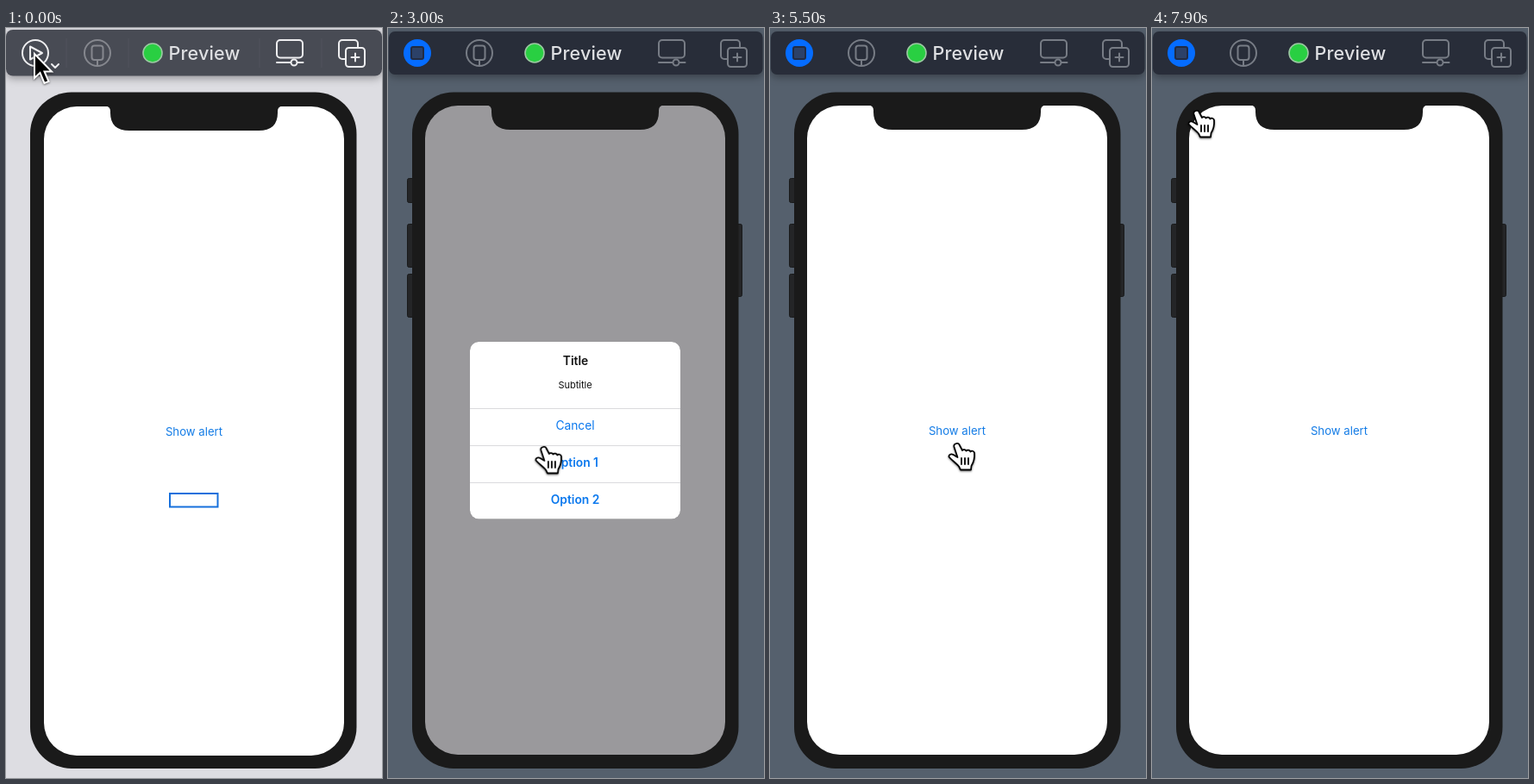
An HTML page that plays this animation: 436 by 870 pixels, repeating every 8 s.

```html
<!DOCTYPE html>
<html lang="en">
<head>
<meta charset="utf-8">
<title>Alert preview</title>
<style>
html, body { margin: 0; width: 100%; height: 100%; overflow: hidden; background: #dddde2; }
svg { display: block; width: 436px; height: 870px; font-family: Inter, Roboto, sans-serif; }
text { text-anchor: middle; }

.live, .idle-only, .screen, .trigger, .fade, .cancel, .cursor, .arrow, .hand {
  animation: 8s ease-in-out infinite;
}
.line { fill: none; stroke: currentColor; stroke-width: 2; stroke-linecap: round; stroke-linejoin: round; }
.bar { filter: drop-shadow(0 3px 5px #0005); }
.device { fill: #1a1a1a; }
.button { fill: #242527; stroke: #191a1b; }
.action { fill: #0a78ee; }
.strong { font-weight: 600; }

/* Idle canvas gives way to the running preview */
.live { animation-name: go-live; }
.idle-only { animation-name: leave-idle; }
.screen { animation-name: settle; }
@keyframes go-live { 0%, 6.25% { opacity: 0 } 9%, 100% { opacity: 1 } }
@keyframes leave-idle { 0%, 6.25% { opacity: 1 } 9%, 100% { opacity: 0 } }
@keyframes settle {
  0%, 7.5% { transform: translate(1px, 1px) }
  7.51%, 100% { transform: none }
}

/* Alert is shown twice */
.fade { animation-name: alert; }
@keyframes alert {
  0%, 27.5% { opacity: 0 }
  32.5%, 57.5% { opacity: 1 }
  62.5%, 80.8% { opacity: 0 }
  85.8%, 90% { opacity: 1 }
  95%, 100% { opacity: 0 }
}
.trigger { animation-name: tint; }
@keyframes tint {
  0%, 27.5% { fill: #147ce6 }
  28.2%, 57.5% { fill: #96969c }
  62.5%, 80.8% { fill: #147ce6 }
  81.6%, 90% { fill: #96969c }
  95%, 100% { fill: #147ce6 }
}
.cancel { animation-name: press; }
@keyframes press { 0%, 89% { opacity: 1 } 90%, 98% { opacity: .7 } 100% { opacity: 1 } }

.cursor { animation-name: travel; }
@keyframes travel {
  0%, 11% { transform: translate(33px, 30px) }
  23%, 33% { transform: translate(198px, 465px) }
  40%, 43% { transform: translate(172px, 492px) }
  50%, 59% { transform: translate(160px, 533px) }
  67%, 70% { transform: translate(215px, 481px) }
  77%, 84% { transform: translate(199px, 471px) }
  89%, 92.5% { transform: translate(217px, 468px) }
  98.5%, 100% { transform: translate(50px, 95px) }
}
.arrow { animation-name: arrow; }
.hand { animation-name: hand; }
@keyframes arrow { 0%, 14% { opacity: 1 } 14.01%, 100% { opacity: 0 } }
@keyframes hand { 0%, 14% { opacity: 0 } 14.01%, 100% { opacity: 1 } }
.shadow { filter: drop-shadow(0 1px 1px #0008); }
</style>
</head>
<body>
<svg viewBox="0 0 436 870">
  <defs>
    <g id="pin" class="line">
      <circle cx="106" cy="29" r="15"/>
      <rect x="99.5" y="20.5" width="13" height="16.5" rx="3"/>
      <path d="M106 37v7"/>
    </g>
    <g id="tools" class="line">
      <rect x="314" y="14" width="30" height="20.5" rx="4"/>
      <path d="M314 40h16M338 40h6.500"/>
      <circle cx="334" cy="40" r="3.500"/>
      <path d="M393 36h-3a4 4 0 0 1-4-4v-14a4 4 0 0 1 4-4h14a4 4 0 0 1 4 4v4"/>
      <rect x="394" y="23" width="22" height="22" rx="3.500"/>
      <path d="M400.500 34h9M405 29.500v9"/>
    </g>
    <g id="status">
      <circle cx="170" cy="29" r="11" fill="#29cf42" stroke="#9bc8a2" stroke-width="1.600"/>
      <text x="230" y="37" font-size="21.500" font-weight="500" letter-spacing=".15" fill="#dfe0e3">Preview</text>
    </g>
    <clipPath id="glass"><rect x="43" y="90" width="348" height="753" rx="38"/></clipPath>
  </defs>

  <rect width="436" height="870" fill="#dddde2"/>
  <g>
    <rect class="bar" y="2" width="436" height="53.500" rx="8" fill="#484b54"/>
    <path d="M70 12v34M142 12v34M294 12v34M366 12v34" stroke="#50535c"/>
    <g class="line" color="#eeeef0">
      <circle cx="34" cy="29" r="15"/>
      <path d="M28 21.500v15l14-7.500z"/>
      <path d="M53 42l4 4 4-4"/>
    </g>
    <use href="#pin" color="#85878e"/>
    <use href="#status"/>
    <use href="#tools" color="#eeeef0"/>
  </g>

  <g class="live">
    <rect width="436" height="870" fill="#55606d"/>
    <rect class="bar" x="1" y="4" width="433.500" height="50" rx="7" fill="#282d39"/>
    <circle cx="34" cy="29" r="16" fill="#056cff"/>
    <rect x="27" y="22" width="14" height="14" rx="2" fill="#2c4168" stroke="#222b42" stroke-width="2"/>
    <use href="#pin" color="#777c85"/>
    <use href="#status"/>
    <use href="#tools" color="#777c85"/>
    <g class="button">
      <rect x="22.500" y="174.500" width="8" height="28" rx="2"/>
      <rect x="22.500" y="227.500" width="8" height="50" rx="2"/>
      <rect x="22.500" y="285.500" width="8" height="50" rx="2"/>
      <rect x="402.500" y="227.500" width="8" height="84" rx="2"/>
    </g>
  </g>

  <rect class="device" x="28" y="74.500" width="378.500" height="784.500" rx="48"/>
  <g class="screen">
    <g clip-path="url(#glass)">
      <rect x="43" y="90" width="348" height="753" fill="#fff"/>
      <text class="trigger" x="217" y="471.500" font-size="13.200">Show alert</text>
      <rect class="fade" x="43" y="90" width="348" height="753" fill="#04020866"/>
    </g>
    <path class="device" d="M114 89.500q6 .5 6 6v2q0 20.500 22 20.500h150q22 0 22-20.500v-2q0-5.500 6-6z"/>
    <rect class="idle-only" x="189" y="539" width="55.500" height="15.500" fill="none" stroke="#1670dc" stroke-width="2"/>
  </g>

  <rect class="fade" x="95" y="364" width="244" height="205.500" rx="10" fill="#00000080"/>
  <g class="fade">
    <rect x="95" y="364" width="244" height="205.500" rx="10" fill="#fff"/>
    <path d="M95 441.500h244M95 484.500h244M95 527.500h244" stroke="#dadadd"/>
    <text class="strong" x="217.500" y="390.500" font-size="13.800" fill="#111">Title</text>
    <text x="217" y="418" font-size="11" fill="#111">Subtitle</text>
    <g class="action" font-size="13.800">
      <text class="cancel" x="217" y="466">Cancel</text>
      <text class="strong" x="217" y="509">Option 1</text>
      <text class="strong" x="217" y="551.500">Option 2</text>
    </g>
  </g>

  <g class="cursor">
    <g class="shadow">
      <path class="arrow" d="M0 0v28l6.500-6 5 12 5-2-5-11.500h8.500z" fill="#000" stroke="#fff" stroke-width="2"/>
      <g class="hand" stroke="#000" stroke-width="1.800" stroke-linecap="round" stroke-linejoin="round">
        <path fill="#fff" d="M1 1C-1 1.500-2 3-1.500 5L2.500 17-2.500 14C-5 12.500-8 14-7.500 16.500-3.500 21 1 24 4 27.500L6 31.500H18L18.500 27C21 23 22.500 18 22 12 21.500 9.500 18.500 9 17.500 10.500 16.500 8.500 14 8 12.500 9.500 11.500 8 9 7.500 8 9L4.500 2.500C4 1 2.500.5 1 1z"/>
        <path fill="none" d="M7 18v7M11 18v7M15 18v7"/>
      </g>
    </g>
  </g>
</svg>
</body>
</html>
```
